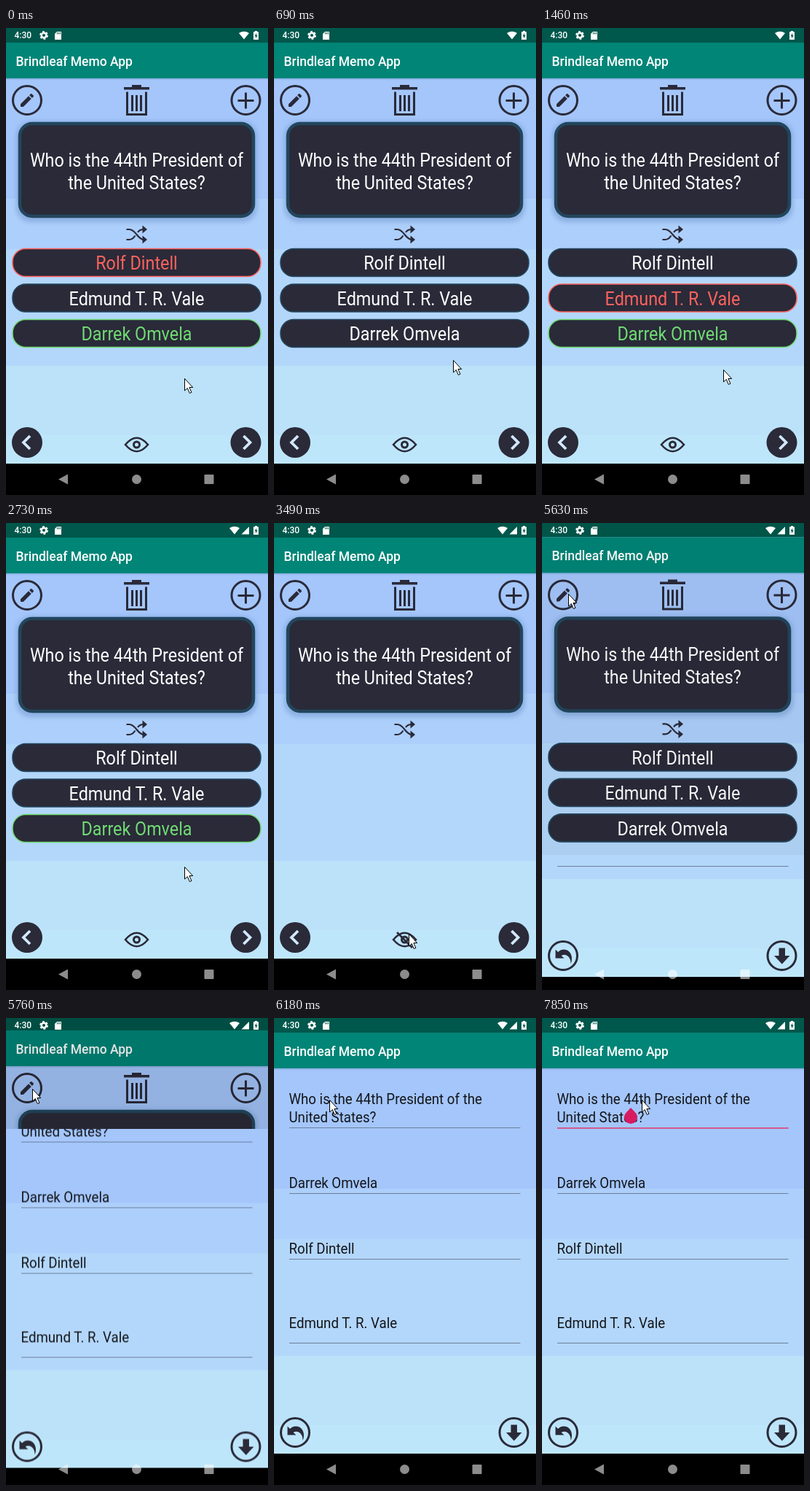
Recreate the animation shown at these times as an HTML page. Size 360 by 640 pixels, loop 8 s.

```html
<!DOCTYPE html>
<html lang="en">
<head>
<meta charset="utf-8">
<title>Study cards</title>
<style>
html, body { margin: 0; width: 100%; height: 100%; overflow: hidden; background: #000; }
#stage { position: relative; width: 360px; height: 640px; overflow: hidden; }
.screen, .screen svg, .top { position: absolute; left: 0; top: 0; width: 360px; height: 640px; display: block; }
.screen { background: linear-gradient(#a4c6fb 234px, #adcffb 234px 303px, #b3d7fb 303px 463px, #bbe2f9 463px 558px, #bee6fa 558px 597.5px, #000 597.5px); }

text { font-family: Roboto, sans-serif; }
.cond { font-size: 26.25px; fill: #fff; text-anchor: middle; transform: scaleX(.89); transform-origin: 179.5px 0; }
.field { font-size: 21px; fill: #14161c; transform: scaleX(.89); transform-origin: 20.5px 0; }
.title { font-size: 17.5px; font-weight: 500; fill: #fff; }
.ink { fill: #2a2a39; }
.line { fill: none; stroke: #2a2a39; }
.rule { stroke: #6d7f9b; stroke-width: 1; }
.row { color: #fff; stroke: #24465d; }
.row rect { fill: #2a2a39; stroke-width: 1.6; }
.row text { fill: currentColor; stroke: none; }

/* Every change is a hard cut on one shared 8 s clock. */
.row, #choices, #slash, #wifi, #signal, #home, #dim, #edit, #focus, #caret, #handle, #cursor {
  animation: 8s step-end infinite;
}
#row1 { animation-name: row1; }
#row2 { animation-name: row2; }
#row3 { animation-name: row3; }
#choices { animation-name: choices; }
#slash { opacity: 0; animation-name: slash; }
#wifi { animation-name: wifi; }
#signal { opacity: 0; animation-name: signal; }
#home { animation-name: home; }
#dim { background: #000; opacity: 0; animation-name: dim; }
#edit { opacity: 0; animation-name: edit; }
#focus { opacity: 0; animation-name: focus; }
#caret { opacity: 0; animation-name: caret; }
#handle { opacity: 0; animation-name: handle; }
#cursor { animation-name: cursor; }

@keyframes row1 {
  0% { color: #fd625c; stroke: #fd625c; }
  7.125% { color: #fff; stroke: #24465d; }
}
@keyframes row2 {
  0%, 23.875% { color: #fff; stroke: #24465d; }
  14.75% { color: #fd625c; stroke: #fd625c; }
}
@keyframes row3 {
  0%, 14.75%, 29.25% { color: #70db72; stroke: #70db72; }
  7.125%, 23.875%, 35.625% { color: #fff; stroke: #24465d; }
}
@keyframes choices { 0%, 51.25% { opacity: 1; } 43.625% { opacity: 0; } }
@keyframes slash { 0%, 51.25% { opacity: 0; } 43.625% { opacity: 1; } }
@keyframes wifi { 0% { transform: none; } 23.875%, 100% { transform: translateX(-13px); } }
@keyframes signal { 0% { opacity: 0; } 23.875% { opacity: .4; } 27.375%, 100% { opacity: 1; } }
@keyframes home {
  0% { transform: translateY(0); }
  70.375% { transform: translateY(-.6px); }
  72% { transform: translateY(-3px); }
  73.875% { transform: translateY(-9px); }
  75.375%, 100% { transform: translateY(-12px); }
}
@keyframes dim { 0% { opacity: 0; } 70.375% { opacity: .04; } 72%, 100% { opacity: .1; } }
@keyframes edit {
  0% { opacity: 0; }
  70.375% { opacity: 1; transform: translateY(25px); clip-path: inset(430px 0 0 0); }
  72% { opacity: 1; transform: translateY(19.5px); clip-path: inset(132.5px 0 0 0); }
  73.875% { opacity: 1; transform: translateY(6px); clip-path: inset(18px 0 0 0); }
  75.375% { opacity: 1; transform: translateY(1px); clip-path: inset(0 0 0 0); }
  77.25%, 100% { opacity: 1; transform: translateY(0); clip-path: inset(0 0 0 0); }
}
@keyframes focus { 0% { opacity: 0; } 88.875%, 100% { opacity: 1; } }
@keyframes caret { 0%, 94.375% { opacity: 0; } 88.875% { opacity: 1; } }
@keyframes handle { 0% { opacity: 0; } 98.125%, 100% { opacity: 1; } }
@keyframes cursor {
  0% { transform: translate(245px, 480px); }
  1.875% { transform: translate(245px, 482px); }
  5.25% { transform: translate(246px, 480px); }
  8.625% { transform: translate(246px, 455px); }
  10.125% { transform: translate(247px, 415px); }
  11.625% { transform: translate(247px, 382px); }
  14.75% { transform: translate(246px, 422px); }
  16.625% { transform: translate(248px, 448px); }
  18.25% { transform: translate(249px, 468px); }
  25.375% { transform: translate(250px, 425px); }
  30.75% { transform: translate(247px, 450px); }
  32.25% { transform: translate(246px, 476px); }
  34.125% { transform: translate(245px, 471px); }
  35.625% { transform: translate(252px, 464px); }
  37.5% { transform: translate(240px, 480px); }
  39% { transform: translate(205px, 540px); }
  40.5% { transform: translate(185px, 563px); }
  45.625% { transform: translate(180px, 566px); }
  49.375% { transform: translate(189px, 508px); }
  51.25% { transform: translate(110px, 280px); }
  52.75% { transform: translate(38px, 81px); }
  54.75% { transform: translate(36px, 78px); }
  56.25% { transform: translate(33px, 80px); }
  58.125% { transform: translate(32px, 97px); }
  60% { transform: translate(34px, 97px); }
  61.5% { transform: translate(36px, 97px); }
  73.875% { transform: translate(42px, 99px); }
  75.375% { transform: translate(60px, 105px); }
  77.25% { transform: translate(76px, 112px); }
  78.75% { transform: translate(104px, 109px); }
  80.625% { transform: translate(116px, 115px); }
  82.125% { transform: translate(125px, 122px); }
  83.625% { transform: translate(128px, 125px); }
  87.375% { transform: translate(132px, 118px); }
  88.875%, 100% { transform: translate(137px, 112px); }
}
</style>
</head>
<body>
<div id="stage">
  <div class="screen" id="home">
    <svg viewBox="0 0 360 640">
      <defs>
        <g id="bar">
          <rect y="69" width="360" height="2" fill="#1f4f80" opacity=".14"/>
          <rect width="360" height="20" fill="#00574b"/>
          <rect y="20" width="360" height="49" fill="#008577"/>
          <text class="title" x="13.5" y="52">Brindleaf Memo App</text>
        </g>
        <circle id="ring" class="line" r="19.5" stroke-width="3"/>
        <filter id="blur" x="-10%" y="-20%" width="120%" height="140%"><feGaussianBlur stdDeviation="3"/></filter>
      </defs>
      <use href="#bar"/>

      <use href="#ring" x="29" y="99"/>
      <path class="ink" d="M20 104.3v3.700h3.800L34.800 97 31 93.200zM37.700 94q.8-.7 0-1.400l-2.300-2.300q-.7-.7-1.400 0l-1.900 1.800 3.800 3.800z"/>

      <path class="ink" d="M173 78h13v3h11v3.500h-35V81h11z"/>
      <path class="line" stroke-width="3" d="M166.500 87.500v31h26v-31M173.500 92v22M179.500 92v22M185.500 92v22"/>

      <use href="#ring" x="329.5" y="99"/>
      <path class="line" stroke-width="3" d="M318.5 99.500h22M329.500 88.500v22"/>

      <rect x="14" y="128" width="331" height="138" rx="20" fill="#6f96cd" opacity=".55" filter="url(#blur)"/>
      <rect x="19" y="131" width="321" height="127" rx="17" fill="#2a2a39" stroke="#22465c" stroke-width="4.5"/>
      <text class="cond" x="179.5" y="190">Who is the 44th President of</text>
      <text class="cond" x="179.5" y="221">the United States?</text>

      <path class="line" stroke-width="2.2" d="M165.5 276h4c9 0 11 14 20 14h1M165.5 290h4c4 0 6-2.5 8-5.5M181 280c2-3 4-4 8-4h1"/>
      <path class="ink" d="M187.5 270.5l6.500 5.500-6.500 5.500zM187.500 284.500l6.500 5.500-6.500 5.500z"/>

      <g id="choices">
        <g class="row" id="row1"><rect x="9" y="302.5" width="341" height="38" rx="18"/><text class="cond" x="179.5" y="331.5">Rolf Dintell</text></g>
        <g class="row" id="row2"><rect x="9" y="351" width="341" height="38" rx="18"/><text class="cond" x="179.5" y="380">Edmund T. R. Vale</text></g>
        <g class="row" id="row3"><rect x="9" y="399.5" width="341" height="38" rx="18"/><text class="cond" x="179.5" y="428.5">Darrek Omvela</text></g>
      </g>

      <circle class="ink" cx="29" cy="568" r="21"/>
      <circle class="ink" cx="329.5" cy="568" r="21"/>
      <path fill="none" stroke="#d3e8fb" stroke-width="3.8" d="M33 559l-9 9 9 9M326.500 559l9 9-9 9"/>

      <path class="line" stroke-width="2.6" d="M164 571q15.500-18.500 31 0q-15.500 18.500-31 0z"/>
      <circle class="line" cx="179.5" cy="571" r="4" stroke-width="3"/>
      <path id="slash" class="line" stroke-width="2.6" d="M169 561l21 21"/>
    </svg>
  </div>
  <div class="top" id="dim"></div>

  <div class="screen" id="edit">
    <svg viewBox="0 0 360 640">
      <use href="#bar"/>
      <text class="field" x="20.5" y="118.5">Who is the 44th President of the</text>
      <text class="field" x="20.5" y="143.5">United States?</text>
      <text class="field" x="20.5" y="233">Darrek Omvela</text>
      <text class="field" x="20.5" y="323">Rolf Dintell</text>
      <text class="field" x="20.5" y="425.5">Edmund T. R. Vale</text>
      <path class="rule" d="M21 150.500h317.500M21 240.500h317.500M21 330.500h317.500M21 445.500h317.500"/>
      <path id="focus" stroke="#dc4a80" stroke-width="1.8" d="M21 150.800h317.500"/>
      <path id="caret" stroke="#d81b60" stroke-width="2" d="M123 95v28"/>
      <path id="handle" fill="#d81b60" d="M122 123l6 6.300a9 9 0 1 1-12 0z"/>

      <use href="#ring" x="29" y="568"/>
      <path class="ink" d="M18.500 559.500L22 563C29 556 41 560 41 572Q41 576 39.500 579C40 570 33 564 26.500 568L30.500 571.500H18.500z"/>
      <use href="#ring" x="329.5" y="568"/>
      <path class="ink" d="M325.500 557.500h8.500v10.500h6.500L329.800 579.500 319 568h6.500z"/>
    </svg>
  </div>

  <svg class="top" viewBox="0 0 360 640">
    <g fill="#fff">
      <text x="11.5" y="14.3" font-size="12" font-weight="500">4:30</text>
      <circle cx="52" cy="10" r="3.3" fill="none" stroke="#fff" stroke-width="2.5"/>
      <circle cx="52" cy="10" r="5" fill="none" stroke="#fff" stroke-width="1.8" stroke-dasharray="2.8 2.436"/>
      <path d="M70 5h6v11h-9V8z"/>
      <path stroke="#00574b" d="M70.500 6v2.500M72.500 6v2.500M74.500 6v2.500"/>
      <path id="wifi" d="M320 7q7-4.500 14 0L327 15.500z"/>
      <path id="signal" d="M334 5v10.500h-10.500z"/>
      <path d="M342 4h3v1.300h2v10.700h-7V5.300h2z"/>
      <path fill="#00574b" d="M344.200 7l-2.600 4.300h1.500v3l2.600-4.300h-1.500z"/>
    </g>
    <g fill="#fff" opacity=".55">
      <path d="M85 611.500v14l-13-7z"/>
      <circle cx="179.5" cy="618.5" r="6.5"/>
      <rect x="272.5" y="612" width="13" height="13" rx="1"/>
    </g>
    <path id="cursor" fill="#fff" stroke="#000" stroke-width="1" stroke-linejoin="round" d="M.5.5v16.500l3.800-3.500 3 7 2.600-1.100-3-6.900h4.800z"/>
  </svg>
</div>
</body>
</html>
```
